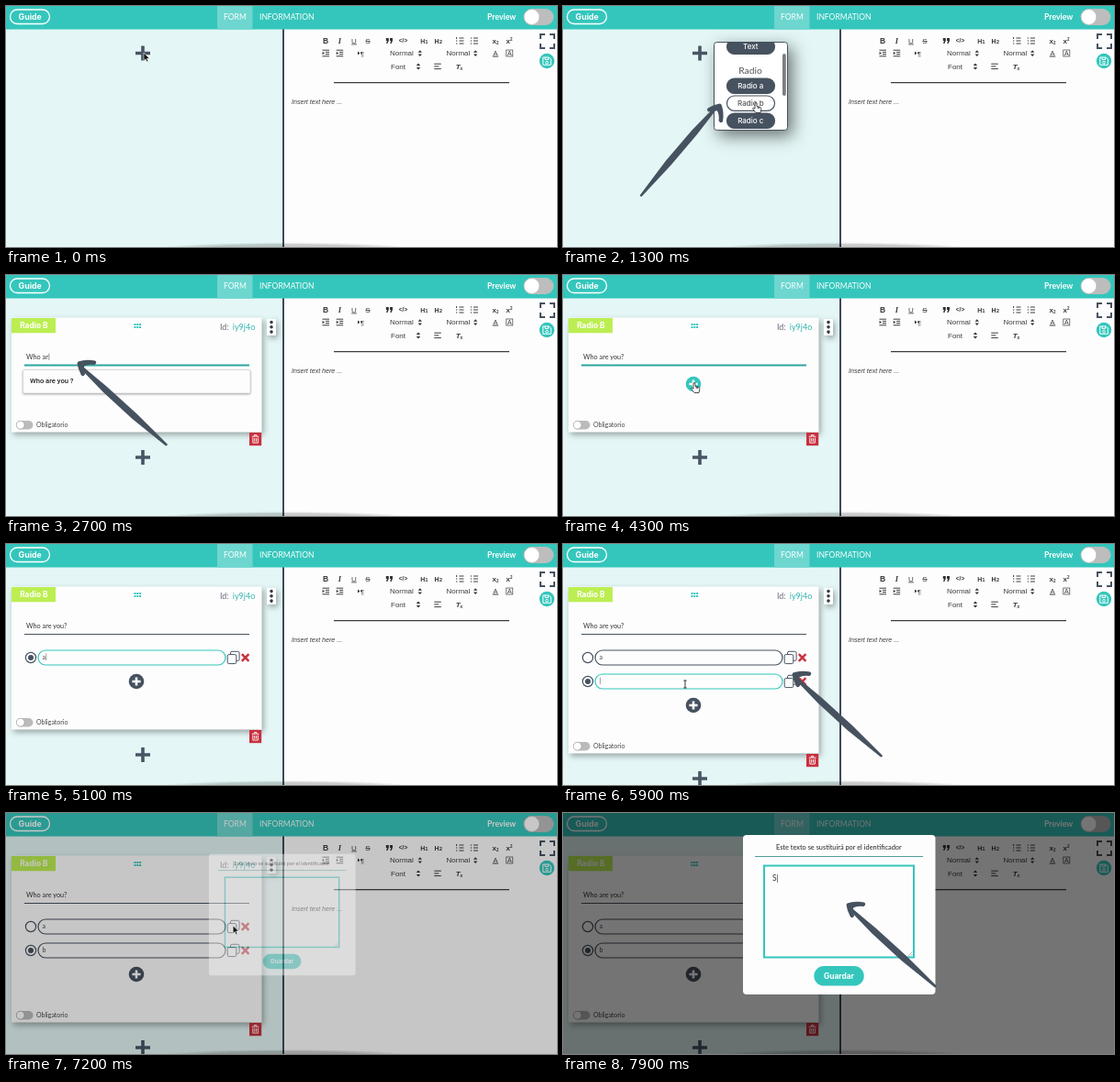
An HTML page for the animation above (8 s loop, 600 by 263 pixels).

```html
<!DOCTYPE html>
<html lang="en">
<head>
<meta charset="utf-8">
<title>Form builder guide</title>
<style>
html, body { margin: 0; width: 100%; height: 100%; overflow: hidden; background: #fff; }
svg { display: block; width: 100%; height: 100%; font-family: Lato, sans-serif; }
text { white-space: pre; }
.bold { font-family: Inter, sans-serif; font-weight: 700; fill: #fff; }
.mid { text-anchor: middle; }
.tool { font-family: "Liberation Sans", sans-serif; font-size: 8px; fill: #3c3c3c; }
.line { fill: none; stroke: #46525f; }
.icon { fill: none; stroke: #3c3c3c; }
.soft { filter: drop-shadow(2px 3px 3px #0005); }
.thin { filter: drop-shadow(0 1px 1px #0005); }
.deep { filter: drop-shadow(5px 6px 9px #0008); }
</style>
</head>
<body>
<svg viewBox="0 0 600 263" preserveAspectRatio="none">
  <defs>
    <clipPath id="menuClip"><rect x="164.5" y="39.5" width="80" height="96" rx="3"/></clipPath>
    <radialGradient id="dock">
      <stop offset=".6" stop-opacity=".2"/><stop offset="1" stop-opacity="0"/>
    </radialGradient>
    <path id="sorter" d="M-2.2-.9 0-3.4 2.2-.9zM-2.2.9 0 3.4 2.2.9z" fill="#333"/>
    <path id="cross" d="M-8 0H8M0-8V8" stroke="#495565" stroke-width="3.6"/>
  </defs>

  <!-- page and header -->
  <rect width="600" height="263" fill="#fefdfe"/>
  <rect y="25" width="302" height="238" fill="#e4f7f6"/>
  <rect x="301" y="25" width="2" height="238" fill="#3e4a58"/>
  <rect width="600" height="25.5" fill="#34c6bc"/>
  <rect x="230" width="38.5" height="25.5" fill="#6dd6cf"/>
  <rect x="4.5" y="4" width="43" height="15.5" rx="7.7" fill="none" stroke="#fff" stroke-width="1.3"/>
  <text class="bold mid" x="26.2" y="15" font-size="8.8">Guide</text>
  <g fill="#fff" font-size="8.5">
    <text x="237" y="15.2">FORM</text>
    <text x="276" y="15.2">INFORMATION</text>
    <text x="524" y="15.3" font-size="8.7" font-weight="700">Preview</text>
  </g>
  <rect x="563.5" y="3" width="33" height="18" rx="9" fill="#bdbdbd"/>
  <circle cx="572.5" cy="12" r="8.4" fill="#fff" stroke="#aaa" stroke-width=".5"/>

  <!-- editor -->
  <g class="tool mid">
    <text x="348" y="41" font-weight="700" font-size="8.5">B</text>
    <text x="363.5" y="41" font-style="italic" font-size="8.5" font-family="Liberation Serif, serif" font-weight="700">I</text>
    <text x="379" y="40.5" text-decoration="underline">U</text>
    <text x="394" y="41" text-decoration="line-through">S</text>
    <text x="432.5" y="40.2" font-size="6.5" font-weight="700">&lt;/&gt;</text>
    <text x="455.5" y="41" font-weight="700" font-size="7">H<tspan font-size="6">1</tspan></text>
    <text x="470.8" y="41" font-weight="700" font-size="7">H<tspan font-size="6">2</tspan></text>
    <text x="533" y="40.5" font-weight="700">x<tspan font-size="4.5" dy="1.5">2</tspan></text>
    <text x="548" y="41" font-weight="700">x<tspan font-size="4.5" dy="-3.5">2</tspan></text>
    <text x="388" y="54.5">¶</text>
    <text x="533" y="53.6" font-size="7.5">A</text>
    <text x="548.3" y="54.2" font-size="7">A</text>
    <text x="493.5" y="69" font-style="italic" font-weight="700">T<tspan font-size="5" dy=".5">x</tspan></text>
  </g>
  <g class="tool">
    <text x="418" y="54.4">Normal</text><text x="479.5" y="54.4">Normal</text><text x="419" y="68.6">Font</text>
    <text x="311" y="107.3" font-size="7.1" font-style="italic">Insert text here ...</text>
  </g>
  <use href="#sorter" x="450.8" y="51.6"/><use href="#sorter" x="511.2" y="51.6"/><use href="#sorter" x="449" y="66"/>
  <path fill="#333" d="M413.8 35h3v3l-1.4 3h-1.3l.8-3h-1.1zm4.2 0h3v3l-1.4 3h-1.3l.8-3h-1.1zM344.6 49.7v3.6l2.2-1.8zM359.8 49.7v3.6l2.2-1.8zM383 49.5v4l2.4-2z"/>
  <path class="icon" d="M493.5 35h5m-5 3h5m-5 3h5M490.6 34v2m-.6 2h1.4m-1.4 3h1.4M509 35h5m-5 3h5m-5 3h5M505.8 35h1.4m-1.4 3h1.4m-1.4 3h1.4M344.5 48.2h7.5m-4 2.2h4m-4 2.2h4m-7.5 2.2h7.5M359.7 48.2h7.5m-4 2.2h4m-4 2.2h4m-7.5 2.2h7.5M529.8 55h6.4M466.3 63.2h7.5m-7.5 2.7h5m-5 2.7h7.5"/>
  <rect class="icon" x="544.8" y="48" width="7" height="7" stroke-width=".7"/>
  <path class="icon" d="M357 83.6H548" stroke-width="1.2"/>
  <path class="line" stroke-width="2" d="M582 36v-5h5m5 0h5v5m0 5v5h-5m-5 0h-5v-5"/>
  <circle cx="589" cy="60" r="8.2" fill="#34c6bc"/>
  <path fill="none" stroke="#fff" d="M584.8 56h6.5l2 2v6.3h-8.5zM587 56v2.4h3.6V56"/>
  <circle cx="589" cy="61.7" r="1.4" fill="none" stroke="#fff" stroke-width=".9"/>

  <!-- question card -->
  <g id="card">
    <rect id="sheet" class="soft" x="6" y="46.5" width="272.5" height="125" fill="#fefdfe"/>
    <rect x="6" y="47" width="48" height="16.3" fill="#bcee52"/>
    <text class="bold mid" x="30.3" y="58.2" font-size="8.3">Radio B</text>
    <path d="M139.5 54h7.6m-7.6 3h7.6" stroke="#34c6bc" stroke-width="2" stroke-dasharray="2 .8"/>
    <text x="233" y="60" font-size="8.8" fill="#667">Id:</text>
    <text x="246.8" y="60" font-size="9" fill="#34b5ad">iy9j4o</text>
    <rect class="soft" x="284" y="48" width="10" height="18" rx="1" fill="#fff"/>
    <path d="M289 51.5v12" stroke="#333b45" stroke-width="3.6" stroke-linecap="round" stroke-dasharray="0 5.3"/>
    <text id="question" x="22" y="92" font-size="7.3" fill="#333"></text>
    <path id="rule" d="M20 98.5H265"/>
    <g id="hint">
      <rect class="thin" x="18.5" y="103.5" width="247.5" height="25.5" rx="1.5" fill="#fefdfe" stroke="#ccc" stroke-width=".6"/>
      <text x="26" y="117.8" font-size="7.6" font-family="Roboto, sans-serif" font-weight="500" fill="#222">Who are you ?</text>
    </g>
    <g id="rows"></g>
    <g id="add">
      <circle id="addDisc" r="8.3"/>
      <path d="M-4.6 0H4.6M0-4.6V4.6" stroke="#fff" stroke-width="2.6"/>
    </g>
    <g id="foot">
      <rect x="11" y="159" width="18.5" height="9.4" rx="4.7" fill="#bbb"/>
      <circle cx="15.7" cy="163.7" r="4.4" fill="#fff" stroke="#888" stroke-width=".5"/>
      <text x="33" y="166.2" font-size="7" fill="#444">Obligatorio</text>
      <rect x="265" y="172" width="13.2" height="14.2" fill="#c9303e"/>
      <path d="M267.8 176.2h7.6m-5-.3v-1.4h2.4v1.4M268.8 177.5v5.6h5.6v-5.6m-3.7.6v3.6m1.8-3.6v3.6" fill="none" stroke="#fff" stroke-width=".9"/>
    </g>
  </g>
  <use id="pagePlus" href="#cross"/>

  <!-- field menu -->
  <g id="menu">
    <rect class="deep" x="164.5" y="39.5" width="80" height="96" rx="3" fill="#fff" stroke="#46525f"/>
    <g clip-path="url(#menuClip)"><g id="items">
      <g class="mid" font-size="10.3" fill="#555"><text x="204" y="56">Text</text><text x="204" y="99">Radio</text></g>
    </g></g>
    <rect id="thumb" x="239" width="3.8" height="46" rx="1.9" fill="#7d7d7d"/>
  </g>

  <ellipse cx="304" cy="264" rx="135" ry="6" fill="url(#dock)"/>

  <!-- dialog -->
  <rect id="shade" width="600" height="263" fill="#000"/>
  <g id="dialog">
    <rect x="196" y="24" width="209.5" height="174" rx="4" fill="#fefdfe"/>
    <text class="mid" x="300.3" y="40" font-size="7.4" fill="#222">Este texto se sustituirá por el identificador</text>
    <path d="M209 47.5H392" stroke="#4f9f9c"/>
    <rect x="219" y="57.5" width="163" height="100" fill="#fefdfe" stroke="#34c6bc" stroke-width="2"/>
    <path d="M376 156l4.5-4.5m-2 4.5 2-2" stroke="#888" stroke-width=".6"/>
    <text id="note" x="228" y="73.5" font-size="8.5" fill="#333"></text>
    <rect x="273.3" y="167" width="54.5" height="21.6" rx="10.8" fill="#34c6bc"/>
    <text class="bold mid" x="300.5" y="180.8" font-size="8.3">Guardar</text>
  </g>

  <!-- pointers -->
  <g id="pointer" stroke-linejoin="round">
    <path id="arrow" d="M0 0V8.7L2 6.9 3.4 10 4.9 9.3 3.5 6.3H6.2z" fill="#111" stroke="#fff" stroke-width=".6"/>
    <path id="hand" d="M-1 0Q0-1 1 0V3.4L5 4.4Q6 5 5.8 6.5L5 10.5H0L-3.2 6.4Q-3.6 5-2.2 5.2L-1 6.2zM2.2 4v2m1.5-1.6v1.8" fill="#fff" stroke="#222" stroke-width=".8"/>
    <path id="beam" d="M-1.7-4h3.4M0-4V4M-1.7 4h3.4" fill="none" stroke="#222" stroke-width=".9"/>
  </g>
  <g id="sketch" fill="#46525f">
    <path d="M3 3.6 31 27 64 57 96.6 89.6Q97.4 91.6 95 91.4L58.5 62 26.5 32.5 1 6z"/>
    <path d="M-.5-.5Q8-3.4 18-1.4 20.8.8 17.5 3 10 2 6 4.4 6 9 7 13.6 5 16.6 2.8 14-.9 7-1.5 1z"/>
  </g>
</svg>
<script>
const LOOP = 8000, DARK = '#46525f', TEAL = '#34c6bc';
const $ = id => document.getElementById(id);
const show = (id, on) => $(id).style.display = on ? '' : 'none';
const set = (el, attrs) => { for (const k in attrs) el.setAttribute(k, attrs[k]); };
const move = (id, x, y) => set($(id), { transform: `translate(${x} ${y})` });
const clamp = v => Math.max(0, Math.min(1, v));
const ease = v => { v = clamp(v); return v * v * (3 - 2 * v); };
const typed = (text, t, start, step) => text.slice(0, Math.max(0, Math.floor((t - start) / step)));
const during = (t, a, b) => t >= a && t < b;

const pills = [['Text', 69], ['Radio a', 112], ['Radio b', 131], ['Radio c', 150]];
$('items').innerHTML += pills.map(([name, y]) =>
  `<g class="pill"><rect x="178.5" y="${y - 8}" width="52" height="16.4" rx="8.2" stroke="${DARK}" stroke-width="1.2"/>
   <text class="mid" x="204.3" y="${y + 3}" font-size="8" font-weight="500" font-family="Inter, sans-serif">${name}</text></g>`).join('');
const pillEls = [...document.querySelectorAll('.pill')];

$('rows').innerHTML = [124, 150].map(y =>
  `<g class="row" transform="translate(0 ${y})">
    <circle class="line" cx="27" r="5.6" stroke-width="1.2"/><circle class="dot" cx="27" r="3" fill="${DARK}"/>
    <rect class="box" x="35" y="-8" width="204" height="16" rx="8" fill="#fefdfe" stroke-width="1.2"/>
    <text class="val" x="39.5" y="2.4" font-size="7" fill="#444"></text>
    <g class="copy" fill="#fefdfe"><rect x="244.5" y="-6.7" width="9.6" height="10" rx="1.5"/><rect x="241.2" y="-3.4" width="9.6" height="10" rx="1.5"/></g>
    <path d="M256.8-3.8l7.6 7.6m0-7.6l-7.6 7.6" stroke="#c9303e" stroke-width="2.4"/>
  </g>`).join('');
const rowEls = [...document.querySelectorAll('.row')];

// pointer path: time, x, y, shape ('' hides it)
const path = [
  [0, 150, 51, 'arrow'], [350, 150, 51, 'arrow'], [800, 204, 92, 'hand'], [1200, 210, 106, 'hand'],
  [1500, 210, 106, 'arrow'], [1900, 75, 91, 'beam'], [2100, 75, 91, ''], [3500, 90, 132, 'arrow'],
  [4150, 143, 118, 'hand'], [4450, 143, 118, 'arrow'], [4750, 133, 125, 'beam'], [4950, 133, 125, ''],
  [5150, 133, 126, 'arrow'], [5400, 143, 149, 'hand'], [5550, 143, 149, 'arrow'], [5750, 133, 153, 'beam'],
  [6300, 133, 153, ''], [6500, 140, 150, 'arrow'], [6900, 244, 125, 'hand'], [7150, 244, 125, 'arrow'],
  [7450, 285, 95, 'beam'], [7650, 285, 95, '']
];
// guide arrows: start, end, tip x, tip y, turn
const sketches = [[600, 1500, 172, 108, 88], [2250, 3500, 79, 95, 0], [5650, 7150, 251, 141, 0], [7450, 8000, 310, 99, 0]];

function pointerAt(t) {
  const i = path.findLastIndex(p => p[0] <= t), a = path[i], b = path[i + 1] || a;
  const k = ease((t - a[0]) / (b[0] - a[0] || 1));
  return { x: a[1] + (b[1] - a[1]) * k, y: a[2] + (b[2] - a[2]) * k, shape: a[3] };
}

function drawMenu(t, p) {
  show('menu', during(t, 350, 1500));
  const scroll = 25 * ease((t - 600) / 500);
  move('items', 0, -scroll);
  set($('thumb'), { y: 40.5 + scroll * .46 });
  pillEls.forEach((el, i) => {
    const hot = p.x > 178 && Math.abs(p.y + scroll - pills[i][1]) < 9;
    set(el.children[0], { fill: hot ? '#fff' : DARK });
    set(el.children[1], { fill: hot ? '#555' : '#fff' });
  });
}

function drawCard(t) {
  const made = t >= 1500, count = (t >= 4450) + (t >= 5500), drop = [0, 31, 57][count];
  show('card', made);
  move('pagePlus', 149, made ? 199 + drop : 51.5);
  set($('sheet'), { height: 125 + drop });
  move('foot', 0, drop);

  const asking = during(t, 1950, 4450);
  $('question').textContent = typed('Who are you?', t, 2100, 100) + (during(t, 1950, 3500) ? '|' : '');
  set($('rule'), { stroke: asking ? '#2aa79f' : DARK, 'stroke-width': asking ? 1.9 : 1.2 });
  show('hint', during(t, 2100, 3500));
  show('add', t >= 3500);
  move('add', 142, 119 + drop);
  const hot = during(t, 4050, 4450) || during(t, 5350, 5500);
  set($('addDisc'), { fill: hot ? TEAL : DARK });

  rowEls.forEach((el, i) => {
    const part = c => el.querySelector('.' + c);
    const focus = i ? during(t, 5500, 7150) : during(t, 4800, 5500);
    const caret = focus && t < 6500;
    el.style.display = i < count ? '' : 'none';
    part('dot').style.display = i === count - 1 ? '' : 'none';
    set(part('box'), { stroke: focus ? TEAL : DARK });
    part('val').textContent = typed('ab'[i], t, i ? 6200 : 4900, 100) + (caret ? '|' : '');
    set(part('copy'), { stroke: !i && during(t, 6850, 7150) ? TEAL : DARK });
  });
}

function drawDialog(t) {
  const k = clamp((t - 7150) / 250);
  show('shade', k > 0);
  show('dialog', k > 0);
  set($('shade'), { opacity: .54 * clamp(k * 2) });
  const size = .7 + .3 * ease(k) + .05 * Math.sin(k * Math.PI);
  set($('dialog'), { transform: `translate(300.7 111) scale(${size}) translate(-300.7 -111)`, opacity: clamp(k * 2) });
  $('note').textContent = typed('S', t, 7700, 100) + (t >= 7500 ? '|' : '');
}

function draw(t) {
  const p = pointerAt(t);
  drawMenu(t, p);
  drawCard(t);
  drawDialog(t);
  move('pointer', p.x, p.y);
  for (const s of ['arrow', 'hand', 'beam']) show(s, s === p.shape);
  const s = sketches.find(s => during(t, s[0], s[1]));
  show('sketch', s);
  if (s) set($('sketch'), { transform: `translate(${s[2]} ${s[3]}) rotate(${s[4]})`, opacity: clamp((t - s[0]) / 150 + .2) });
}

const start = performance.now();
function tick() {
  draw((performance.now() - start) % LOOP);
  requestAnimationFrame(tick);
}
tick();
</script>
</body>
</html>
```
